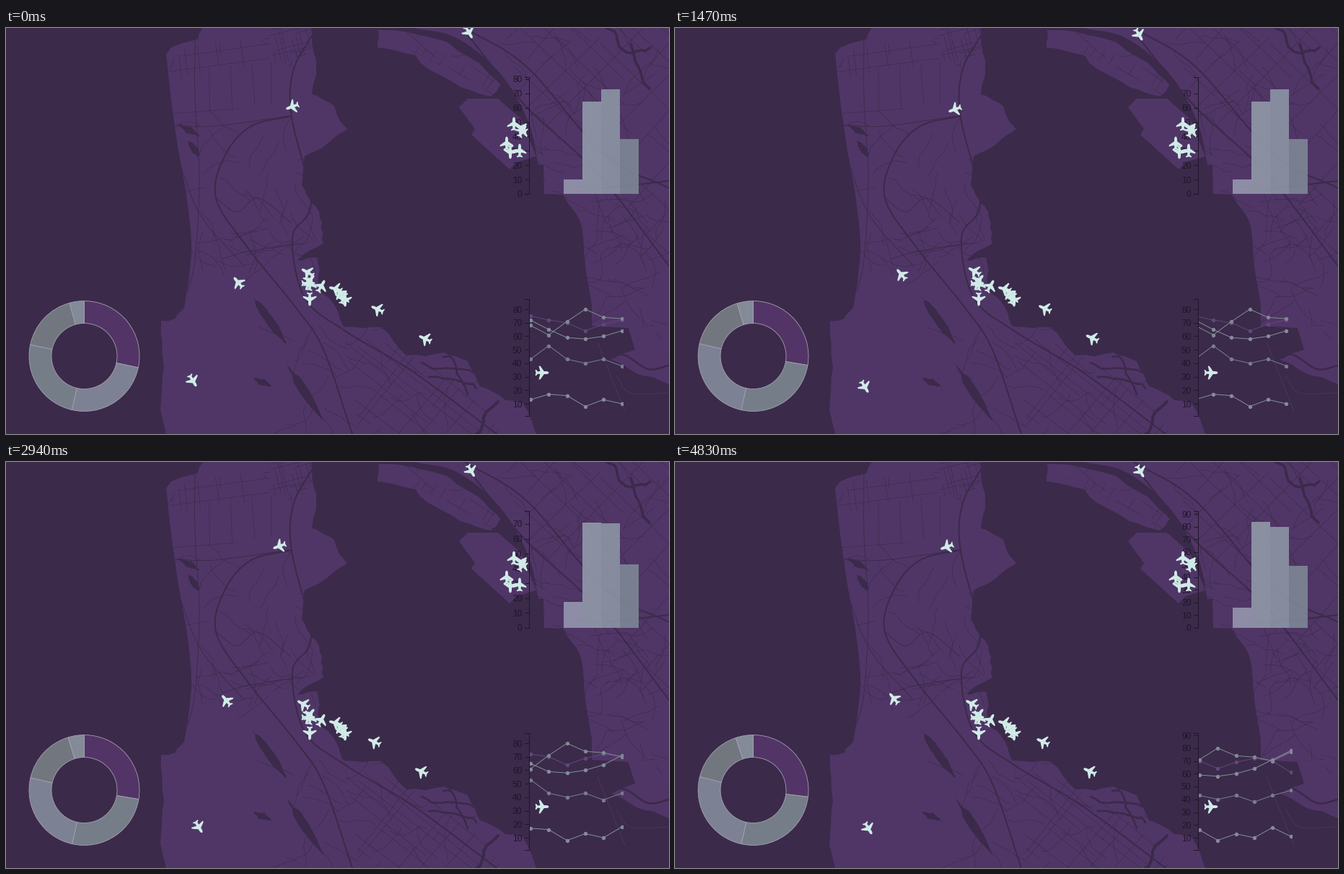
A matplotlib script that plays this animation: 919 by 563 pixels, repeating every 5390 ms.

```python
import numpy as np
import matplotlib.pyplot as plt
from matplotlib.animation import FuncAnimation
from matplotlib.collections import LineCollection
from matplotlib.patches import Polygon, Rectangle, Wedge

W, H, DPI = 919, 563, 128
PX = 72 / DPI
STEP, FRAMES = 70, 77
WATER, LAND, MINT, INK = "#3b2a4a", "#503666", "#d0ebe7", "#20152a"
GREYS = ["#523566", "#7d8194", "#757e88", "#72777f", "#838b98"]
rng = np.random.default_rng(7)

fig = plt.figure(figsize=(W / DPI, H / DPI), dpi=DPI, facecolor=WATER)
ax = fig.add_axes([0, 0, 1, 1])
ax.set(xlim=(0, W), ylim=(H, 0))
ax.axis("off")


def ramp(t, start, end):
    """Progress from 0 to 1 with a soft start and stop."""
    u = np.clip((t - start) / (end - start), 0, 1)
    return u * u * (3 - 2 * u)


def blend(rows, stage):
    """Row at a fractional stage."""
    rows = np.asarray(rows, float)
    k = min(int(stage), len(rows) - 2)
    return rows[k] + (rows[k + 1] - rows[k]) * (stage - k)


def pts(*flat):
    return np.reshape(flat, (-1, 2)).astype(float)


def smooth(points, n=10):
    """Catmull-Rom curve through the points."""
    p = np.vstack([2 * points[0] - points[1], points, 2 * points[-1] - points[-2]])
    u = np.linspace(0, 1, n)[:, None]
    return np.vstack([0.5 * (2 * b + (c - a) * u + (2 * a - 5 * b + 4 * c - d) * u**2
                             + (3 * b - a - 3 * c + d) * u**3)
                      for a, b, c, d in zip(p, p[1:], p[2:], p[3:])])


def ragged(points, amount=1.2, depth=2):
    """Break each edge by seeded midpoint displacement."""
    for _ in range(depth):
        middle = (points[1:] + points[:-1]) / 2
        middle += rng.normal(0, amount, middle.shape)
        points = np.insert(points, np.arange(1, len(points)), middle, axis=0)
        amount /= 2
    return points


def area(points, color=LAND, z=1):
    return ax.add_patch(Polygon(points, fc=color, ec="none", zorder=z))


def strokes(lines, width, clip=None, color=WATER, alpha=1):
    group = LineCollection(lines, colors=color, linewidths=width * PX,
                           capstyle="round", alpha=alpha, zorder=2)
    ax.add_collection(group, autolim=False)
    if clip is not None:
        group.set_clip_path(clip)


def street_grid(corners, angle, gap, jitter=0.25):
    region = ax.add_patch(Polygon(corners, fc="none", ec="none"))
    mid, reach = corners.mean(0), np.ptp(corners, axis=0).max()
    lines = []
    for a in np.radians([angle, angle + 90]):
        along, across = np.array([np.cos(a), np.sin(a)]), np.array([-np.sin(a), np.cos(a)])
        for d in np.arange(-reach, reach, gap):
            ends = rng.uniform(-1.2, 1.2, 2) * reach
            lines.append([mid + across * (d + rng.normal(0, gap * jitter)) + along * k
                          for k in ends])
    strokes(lines, 0.7, region, alpha=0.85)


def lanes(land, count, x0, y0, x1, y1, heading, length=9):
    """Winding local roads scattered over part of a land area."""
    lines = []
    for _ in range(count):
        angle = np.radians(heading + rng.choice([0, 90, 180])) + rng.normal(0, 0.35)
        turns = angle + np.cumsum(rng.normal(0, 0.28, 7))
        walk = np.cumsum(np.c_[np.cos(turns), np.sin(turns)] * length, axis=0)
        lines.append(walk + (rng.uniform(x0, x1), rng.uniform(y0, y1)))
    strokes(lines, 0.7, land, alpha=0.85)


def draw_land():
    ocean = np.vstack([
        ragged(pts(222, 563, 214, 530, 219, 470, 215, 406, 235, 403, 247, 388)),
        smooth(pts(253, 352, 257, 300, 250, 232, 239, 170, 229, 100, 222, 36)),
        ragged(pts(229, 27, 266, 15, 273, 0))])
    bay = ragged(pts(424, 0, 430, 45, 424, 92, 455, 108, 473, 140, 446, 160, 414, 178,
                     410, 218, 424, 243, 438, 270, 440, 299, 404, 322, 431, 318, 433, 342,
                     438, 368, 462, 398, 468, 414, 520, 415, 555, 454, 608, 450, 640, 462,
                     657, 497, 692, 516, 716, 520, 735, 563), 2.2)
    peninsula = area(np.vstack([ocean, bay]))
    island = area(ragged(pts(515, 0, 515, 27, 568, 38, 584, 56, 630, 82, 672, 95, 687, 78,
                             655, 48, 600, 13, 552, 0)))
    east = area(np.vstack([
        smooth(pts(566, 0, 625, 14, 685, 63, 724, 130, 738, 190)),
        pts(745, 190, 746, 230, 772, 231),
        smooth(pts(777, 240, 797, 272, 803, 330, 812, 384)),
        pts(812, 413, 862, 416, 898, 412, 903, 434, 919, 436, 919, 0)]))
    area(pts(628, 110, 640, 98, 682, 98, 714, 126, 735, 178, 708, 186, 698, 196,
             645, 148, 650, 140))
    area(ragged(pts(862, 414, 899, 413, 919, 432, 919, 494, 876, 480, 838, 460, 872, 446)))
    return peninsula, island, east


def draw_map():
    peninsula, island, east = draw_land()

    # Lakes and reservoirs lie along the valley line
    for x0, y0, x1, y1, width in ((340, 370, 388, 437, 9), (388, 465, 441, 546, 8),
                                  (240, 134, 268, 150, 6), (252, 156, 268, 178, 7),
                                  (342, 485, 370, 498, 6)):
        u = np.linspace(0, 1, 12)
        half = width / 2 * np.sin(np.pi * u) + rng.normal(0, 0.6, 12)
        x, y = x0 + (x1 - x0) * u, y0 + (y1 - y0) * u
        area(np.vstack([np.c_[x + half, y - half], np.c_[x - half, y + half][::-1]]), WATER, 2)
    strokes([ragged(pts(832, 0, 850, 26, 878, 32, 893, 27), 4),
             ragged(pts(866, 22, 872, 46, 892, 84), 4)], 3.5, east)

    # Local streets
    street_grid(pts(366, 0, 424, 0, 424, 34, 366, 56), -14, 5.5, 0.15)
    street_grid(pts(228, 32, 366, 8, 366, 52, 226, 70), -7, 11)
    street_grid(pts(230, 60, 396, 45, 396, 98, 232, 128), -3, 28, 0.1)
    street_grid(pts(470, 425, 540, 440, 640, 500, 690, 563, 490, 563), 38, 13)
    street_grid(pts(690, 0, 919, 0, 919, 330, 850, 230, 720, 110), 43, 22)
    street_grid(pts(536, 20, 600, 30, 680, 70, 670, 86, 570, 36), 33, 11)
    for land, *spread in ((peninsula, 32, 240, 125, 412, 330, 30),
                          (peninsula, 30, 400, 390, 620, 560, 45),
                          (peninsula, 12, 375, 235, 440, 300, 70),
                          (east, 50, 700, 0, 919, 260, 45),
                          (east, 38, 805, 235, 919, 400, 50),
                          (island, 10, 530, 5, 670, 85, 30)):
        lanes(land, *spread)

    # Each group of roads and channels shares one width
    for width, *roads in (
            (0.9, pts(262, 0, 262, 100, 268, 210, 262, 320, 252, 365),
             pts(234, 135, 290, 136, 392, 122), pts(238, 180, 270, 260, 330, 330),
             pts(290, 235, 320, 255, 350, 236, 395, 270), pts(300, 320, 335, 310, 396, 300)),
            (2, pts(396, 122, 340, 136, 304, 176, 291, 236, 336, 306, 402, 388, 440, 446,
                    480, 563),
             pts(424, 10, 398, 60, 396, 124, 423, 242, 397, 290, 414, 374, 470, 420,
                 566, 478, 680, 563),
             pts(640, 10, 720, 108, 822, 204, 919, 330),
             pts(636, 0, 722, 54, 830, 176, 919, 222), pts(790, 220, 830, 222, 919, 212)),
            (5, pts(516, 0, 560, 4, 640, 30, 704, 96)),
            (2.6, pts(832, 460, 856, 453, 890, 473, 919, 468))):
        strokes([smooth(r) for r in roads], width)
    strokes([ragged(pts(576, 464, 648, 478), 6, 3), ragged(pts(586, 484, 652, 500), 6, 3),
             ragged(pts(606, 456, 640, 508), 6, 3)], 2.6)
    strokes([ragged(pts(652, 563, 662, 540, 682, 518), 4)], 4)
    strokes([pts(820, 436, 858, 532), smooth(pts(846, 482, 866, 506, 919, 506))],
            0.8, color=LAND)


class ValueAxis:
    def __init__(self, top, bottom):
        self.top, self.bottom = top, bottom
        ax.plot([718.5, 724.5, 724.5, 718.5], [top, top, bottom, bottom],
                color=INK, lw=PX, zorder=6.5)
        self.ticks = LineCollection([], colors=INK, linewidths=PX, zorder=6.5)
        ax.add_collection(self.ticks, autolim=False)
        self.labels = [ax.text(715.5, 0, str(v), size=12 * PX, color=INK, ha="right",
                               va="center_baseline", family="Liberation Sans", zorder=6.5)
                       for v in range(0, 100, 10)]

    def update(self, scale, limit=100):
        segments = []
        for v, label in zip(range(0, 100, 10), self.labels):
            y = scale(v)
            shown = self.top <= y <= self.bottom and v <= limit
            label.set(visible=shown, y=y)
            if shown:
                segments.append([(718.5, y), (724.5, y)])
        self.ticks.set_segments(segments)


HALF = pts(0, -9.6, 1.5, -8.4, 2, -6, 2, -2.8, 9.3, 2.4, 9.3, 4.4, 2, 2.6,
           1.6, 6, 4, 8, 4, 9.4, 0, 8.5)
PLANE = np.vstack([HALF, HALF[::-1] * (-1, 1)])


def plane_at(x, y, heading):
    c, s = np.cos(np.radians(heading)), np.sin(np.radians(heading))
    return PLANE @ np.array([[c, s], [-s, c]]) + (x, y)


draw_map()

# Parked or holding aircraft: x, y, heading
for spot in ((421, 376, 180), (421, 350, 40), (419, 354, 90), (422, 355, 10),
             (437, 358, 30), (457, 362, 285), (463, 368, 320), (468, 374, 20),
             (470, 377, 180), (704, 133, 0), (714, 139, 300), (716, 143, 30),
             (694, 160, 0), (699, 172, 180), (712, 170, 0), (743, 478, 90)):
    area(plane_at(*spot), MINT, 7)

# Aircraft under way: start, end, heading
FLIGHTS = [((397, 109), (377, 117.5), 250), ((322, 353), (303.5, 328), 320),
           ((259, 489), (268, 508), 149), ((641.5, 6), (645, 13), 150),
           ((515, 390), (510, 388), 295), ((581, 431), (575, 429), 295),
           ((418, 339), (411.5, 335.5), 300)]
planes = [area(PLANE, MINT, 7) for _ in FLIGHTS]

# Ring chart: slices in degrees, before and after the update
SHARES = [[102, 91, 89, 62.5, 15.5], [97, 95.5, 91.5, 57.5, 18.5]]
ring = [ax.add_patch(Wedge((108.5, 455), 76.5, 0, 90, width=31, ec="#aaa3b3",
                           lw=0.8 * PX, zorder=5)) for _ in GREYS]

# Bar chart: counts and axis maximum for each round of data
COUNTS = [[10, 64.4, 73, 38], [17.5, 71, 70.5, 43], [11, 77, 78, 47], [16, 84, 80, 49]]
PEAKS = [81.5, 78.75, 85.85, 92.3]
bars = [ax.add_patch(Rectangle((772.5 + 26 * k, 230), 26, 0, fc=c, alpha=0.87, zorder=5))
        for k, c in enumerate(["#989ab0", "#959dac", "#8f98a7", "#808a97"])]
bar_axis = ValueAxis(68, 230)

# Line chart
SERIES = [[75, 72, 70, 64, 69, 72, 70, 61], [72, 65, 59, 58, 60, 64, 71, 78],
          [68, 61, 71, 80, 74, 73, 70, 77], [43, 53, 43, 40, 43, 38, 43, 47],
          [13, 17, 16, 8, 13, 10, 18, 11]]
SPACING = 25.3
window = Rectangle((725, 370), 130, 175, transform=ax.transData)
curves = []
for color in ("#62477a", "#858c9a", "#7f8a92", "#7a7c8f", "#858b9c"):
    curve, = ax.plot([], [], "-o", color=color, lw=PX, ms=5.4 * PX, mew=0, zorder=6)
    curve.set_clip_path(window)
    curves.append(curve)
line_axis = ValueAxis(376, 538)


def update(i):
    t = i * STEP

    # Positions arrive every third frame
    flown = min(i // 3 * 3 * STEP / 3300, 1)
    for plane, (start, end, heading) in zip(planes, FLIGHTS):
        plane.set_xy(plane_at(*blend([start, end], flown), heading))

    stage = (ramp(t, 980, 1470) + ramp(t, 3780, 4060)) / 2
    edges = np.cumsum([-90, *blend(SHARES, stage)])
    order = [0, 1, 2, 3, 4] if t < 1260 else [0, 2, 1, 3, 4]
    for wedge, start, end, k in zip(ring, edges, edges[1:], order):
        wedge.set(theta1=start, theta2=end, facecolor=GREYS[k])

    stage = ramp(t, 1470, 1680) + ramp(t, 3780, 3850) + ramp(t, 4410, 4830)
    for bar, count in zip(bars, blend(COUNTS, stage)):
        height = 162 * count / blend(PEAKS, stage)
        bar.set(y=230 - height, height=height)
    peak = blend(PEAKS, ramp(t, 1470, 1680) + ramp(t, 3500, 3640) + ramp(t, 4340, 4830))
    bar_axis.update(lambda v: 230 - 162 * v / peak, PEAKS[1] if 1400 <= t < 3570 else 100)

    unit = 1.871 - 0.096 * ramp(t, 4410, 4830)

    def scale(v):
        return 521 - (np.asarray(v) - 10) * unit

    line_axis.update(scale)
    first = int(t >= 1680) + int(t >= 4060)
    shift = 0 if first else SPACING * ramp(t, 1370, 1680)
    xs = 727 + SPACING * np.arange(6) - shift
    for curve, values in zip(curves, SERIES):
        curve.set_data(xs, scale(values[first:first + 6]))
    return []


anim = FuncAnimation(fig, update, frames=FRAMES, interval=STEP, init_func=lambda: [],
                     repeat=True, repeat_delay=0, blit=False)
plt.show()
```
